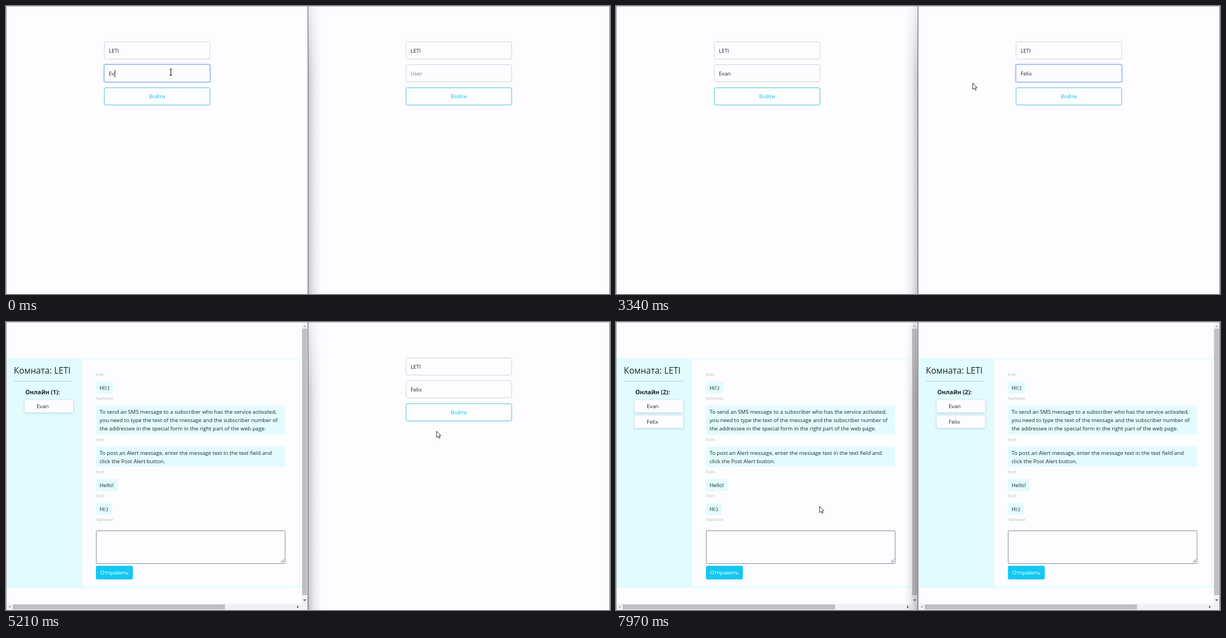
Write an HTML page that moves like this. It is 1081x518 px and loops after 8 s.

```html
<!DOCTYPE html>
<html lang="ru">
<head>
<meta charset="utf-8">
<style>
html, body { margin: 0; width: 100%; height: 100%; overflow: hidden; background: #fdfcff; }
svg { display: block; font-family: "Open Sans", "Noto Sans", sans-serif; }
</style>
</head>
<body>
<svg width="1081" height="518">
  <defs>
    <linearGradient id="side">
      <stop offset="0" stop-color="#3c3840" stop-opacity=".3"/>
      <stop offset=".35" stop-color="#4c4450" stop-opacity=".13"/>
      <stop offset="1" stop-color="#806090" stop-opacity="0"/>
    </linearGradient>
    <linearGradient id="fade" x2="0" y2="1">
      <stop offset="0" stop-color="#fff" stop-opacity=".35"/>
      <stop offset=".25" stop-color="#fff"/>
    </linearGradient>
    <mask id="top"><rect width="24" height="518" fill="url(#fade)"/></mask>
    <filter id="soft" x="-20%" y="-40%" width="140%" height="200%">
      <feDropShadow dx="0" dy="1" stdDeviation="2" flood-color="#405080" flood-opacity=".3"/>
    </filter>
  </defs>
  <g id="stage"></g>
</svg>
<script>
const LOOP = 8000, SIZE = 9.6;
const PAPER = '#fdfcff', INK = '#212529', PALE = '#e2fbff', INFO = [13, 190, 230];
const LEFT_USER = 'Evan', RIGHT_USER = 'Felix', THIRD = 'Nathaniel';
const stage = document.getElementById('stage');
const meter = document.createElement('canvas').getContext('2d');

// Moments of the story, in ms
const left = { user: LEFT_USER, keys: [-400, -200, 130, 300], focus: [-1000, 1560], hover: 3653, click: 4060, chat: 4400 };
const right = { user: RIGHT_USER, keys: [1950, 2100, 2250, 2400, 2550], focus: [1560, 3900], hover: 5354, click: 5790, chat: 6000 };
const path = [
  [0, 295, 119], [750, 295, 119], [1330, 711, 126], [1500, 800, 122], [2800, 800, 122],
  [3340, 639, 138], [3800, 236, 161], [4400, 236, 161], [5210, 770, 196], [5450, 800, 166],
  [5900, 800, 166], [6570, 765, 314], [7000, 765, 314], [7970, 364, 331], [8000, 360, 331]
];

const clamp = v => Math.max(0, Math.min(1, v));
const pulse = (t, on, off) => clamp((t - on) / 150) - clamp((t - off) / 150);
const rect = (x, y, w, h, fill, more = '') =>
  `<rect x="${x}" y="${y}" width="${w}" height="${h}" fill="${fill}" ${more}/>`;
const text = (x, y, str, fill = INK, size = SIZE, more = '') =>
  `<text x="${x}" y="${y}" fill="${fill}" font-size="${size}" ${more}>${str}</text>`;
const shape = (d, fill, more = '') => `<path d="${d}" fill="${fill}" ${more}/>`;
const shift = (x, y, body) => `<g transform="translate(${x} ${y})">${body}</g>`;

function textWidth(str) {
  meter.font = `${SIZE}px "Open Sans", "Noto Sans", sans-serif`;
  return meter.measureText(str).width;
}

function field(y, str, ring, fill = INK) {
  return (ring > 0 ? rect(174, y - 2, 193, 35, '#c4d6fc', `rx="4" opacity="${ring}"`) : '') +
    rect(176, y, 189, 31, PAPER, `rx="2.5" stroke="${ring > .5 ? '#93b5ee' : '#d3d1d8'}"`) +
    text(184, y + 19.3, str, fill);
}

function login(p, t) {
  const typed = p.user.slice(0, p.keys.filter(k => k <= t).length);
  const [from, to] = p.focus;
  const lastKey = Math.max(from, ...p.keys.filter(k => k <= t));
  const caret = t >= from && t < to && Math.floor((t - lastKey) / 530) % 2 === 0;
  const glow = pulse(t, p.hover, p.click);
  const busy = t >= p.click;
  const ink = INFO.map(c => Math.round(c * (1 - glow)));
  return field(64.5, 'LETI', 0) +
    field(105.5, typed || 'User', pulse(t, from, to), typed ? INK : '#7b7982') +
    (caret ? rect(184.3 + textWidth(typed), 115, 1, 13, '#111') : '') +
    `<g opacity="${busy ? .72 : 1}">` +
    rect(176, 147, 189, 31, '#0dcaf0', `rx="2.5" fill-opacity="${glow}" stroke="#45bdd6"`) +
    text(270.5, 165.6, busy ? 'Вход...' : 'Войти', `rgb(${ink})`, SIZE, 'text-anchor="middle"') + '</g>';
}

function message(y, h, w, lines, author, authorY) {
  return rect(161, y, w, h, PALE, 'rx="2"') +
    lines.map((line, i) => text(167.5, y + 14.6 + 15 * i, line)).join('') +
    text(161, authorY, author, '#bcb8c2', 6.9);
}

function scrollbars() {
  const light = '#aaa7ae', dark = '#4b494e';
  return rect(529, 0, 11, 518, '#f2f0f4') + rect(1, 507, 528, 11, '#f2f0f4') +
    rect(530, 12, 9, 479, '#c1bec4') + rect(12, 508, 380, 9, '#c1bec4') +
    shape('M532 9h5l-2.5-3Z', light) + shape('M532 499h5l-2.5 3Z', dark) +
    shape('M8 510v5l-3-2.5Z', light) + shape('M521 510v5l3-2.5Z', dark);
}

function chat(people) {
  const member = (name, i) => rect(33.5, 140.5 + 28 * i, 86.5, 22, PAPER, 'rx="2.5" filter="url(#soft)"') +
    text(55, 155 + 28 * i, name);
  return rect(1, 65, 526, 413, PALE) + rect(136, 67, 389, 408, PAPER) +
    text(14, 92.6, 'Комната: LETI', INK, 15.4, 'font-weight="500"') +
    rect(14, 106, 106, 1, '#b9ccd2') +
    text(34.5, 130, `Онлайн (${people.length}):`, INK, 10.5, 'font-weight="700"') +
    people.map(member).join('') +
    text(161, 97.3, LEFT_USER, '#bcb8c2', 6.9) +
    message(107.5, 21.5, 31, ['Hi!:)'], THIRD, 140.2) +
    message(150.5, 52, 338.5, [
      'To send an SMS message to a subscriber who has the service activated,',
      'you need to type the text of the message and the subscriber number of',
      'the addressee in the special form in the right part of the web page.'], LEFT_USER, 213.8) +
    message(224, 36.5, 338.5, [
      'To post an Alert message, enter the message text in the text field and',
      'click the Post Alert button.'], LEFT_USER, 271.8) +
    message(282, 22, 39, ['Hello!'], LEFT_USER, 315) +
    message(325.5, 21.5, 28, ['Hi:)'], THIRD, 358) +
    rect(161.5, 375.5, 338, 59, PAPER, 'rx="1" stroke="#8a878d"') +
    shape('M492 432.5l5.5-5.5M495 432.5l2.5-2.5', 'none', 'stroke="#555"') +
    rect(161, 438.5, 66, 24.5, '#12c8f2', 'rx="2.5"') +
    text(194, 454.3, 'Отправить', '#fff', SIZE, 'text-anchor="middle"') +
    scrollbars();
}

function mouse(t) {
  const i = path.findIndex(p => p[0] > t);
  const [t0, x0, y0] = path[i - 1], [t1, x1, y1] = path[i];
  const k = (t - t0) / (t1 - t0);
  return [x0 + (x1 - x0) * k, y0 + (y1 - y0) * k];
}

function cursor(t) {
  const [x, y] = mouse(t);
  const p = x < 540 ? left : right;
  const localX = x < 540 ? x : x - 540;
  const inside = localX > 176 && localX < 365 && t < p.chat;
  let body;
  if (inside && y > 105 && y < 137)
    body = shape('M-2.5-5.5h2l.5.5.5-.5h2M0-5V5M-2.5 5.5h2L0 5l.5.5h2', 'none', 'stroke="#222" stroke-width="1.2"');
  else if (inside && y > 147 && y < 178 && t < p.click)
    body = shape('M-1 1Q0-1 1 1V6L6 7Q8 7 7.5 10L6 14H0L-4 9Q-4 7-1 9Z', '#fff', 'stroke="#222" stroke-width=".9"');
  else
    body = shape('M.5.5V11.8L3 9.4 4.9 13.4 6.7 12.6 4.9 8.7H8.3Z', '#fff', 'stroke="#2a282c" stroke-width=".95"');
  return shift(x.toFixed(1), y.toFixed(1), body);
}

function windowEdges(t) {
  const rightActive = (t >= 1560 && t < 3900) || t >= right.click;
  const shadow = rect(0, 0, 24, 518, 'url(#side)', 'mask="url(#top)"');
  return `<g transform="translate(${rightActive ? '540 0) scale(-1 1' : '541 0'})">${shadow}</g>` +
    rect(0, 0, 1081, 1, '#b5b2b8') + rect(0, 0, 1, 518, '#8f8c92') +
    rect(540, 0, 1, 518, '#59565c') + rect(1080, 0, 1, 518, '#77747a');
}

function draw() {
  const t = performance.now() % LOOP;
  const people = t < right.chat ? [LEFT_USER] : [LEFT_USER, RIGHT_USER];
  stage.innerHTML = rect(0, 0, 1081, 518, PAPER) +
    (t < left.chat ? login(left, t) : chat(people)) +
    (t < right.chat ? shift(540, 0, login(right, t)) : shift(540.5, 0, chat(people))) +
    windowEdges(t) + cursor(t);
  requestAnimationFrame(draw);
}
draw();
</script>
</body>
</html>
```
